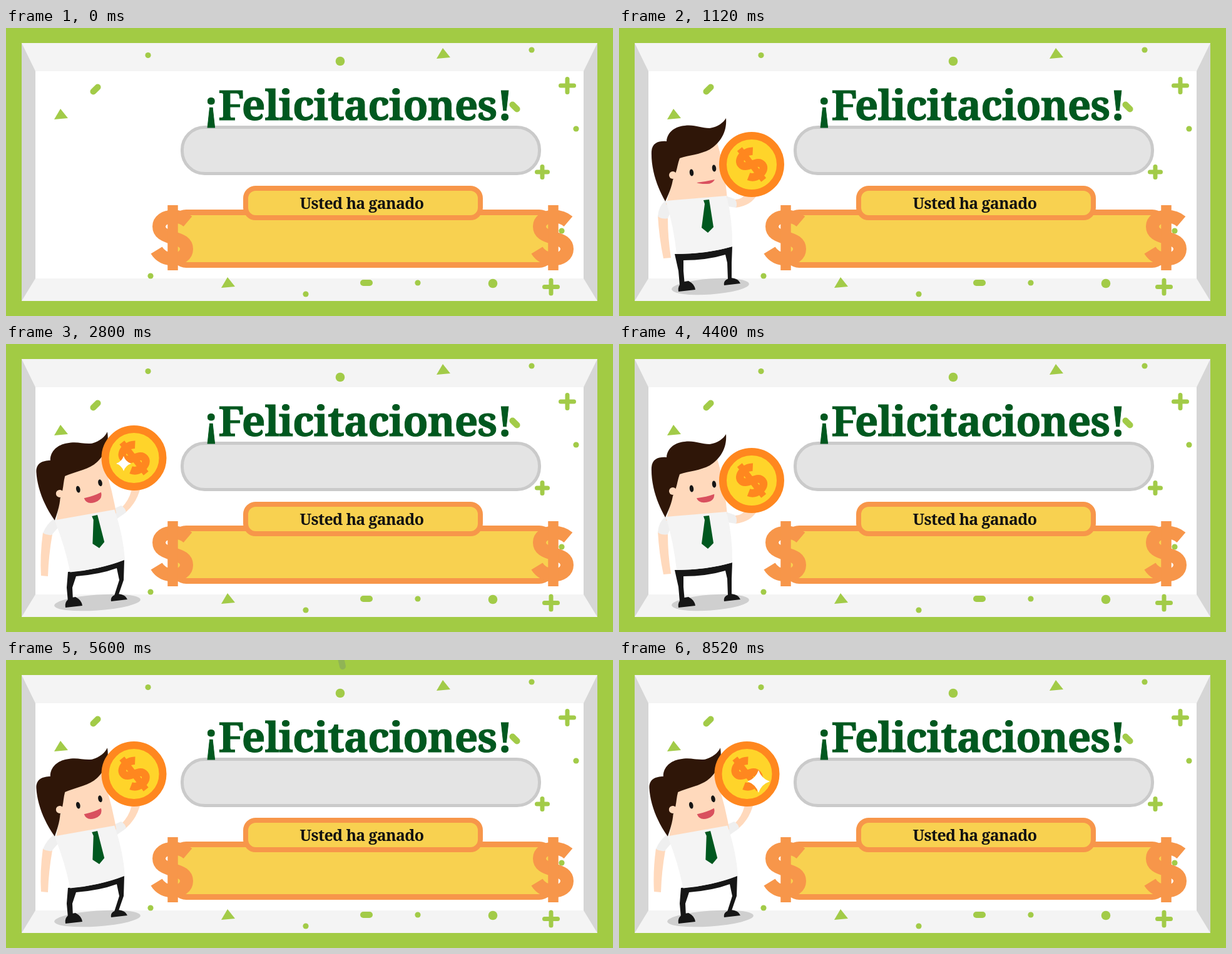
Recreate the animation shown at these times as an HTML page. Size 970 px wide and 460 px high, loop 8560 ms.

```html
<!DOCTYPE html>
<html lang="es">
<head>
<meta charset="utf-8">
<style>
html, body { margin: 0; width: 100%; height: 100%; overflow: hidden; background: #a2cb44; }
svg { display: block; width: 970px; height: 460px; }
text { font-family: "Noto Serif", serif; font-weight: 700; text-anchor: middle; }
</style>
</head>
<body>
<svg viewBox="0 0 970 460">
  <defs>
    <g id="dollar" fill="none" stroke="currentColor">
      <path stroke-width="21" d="M24-26C17-32 10-34 1-34C-13-34-22-27-22-18C-22-8-14-4 0 0C14 4 22 8 22 18C22 28 13 34 0 34C-10 34-20 30-26 20"/>
      <path stroke-width="16.500" d="M0-52V52"/>
    </g>
  </defs>

  <path fill="#f4f4f4" d="M25 24H945V436H25Z"/>
  <path fill="#d6d6d6" d="M25 24L47 69V400L25 436ZM945 24L923 69V400L945 436Z"/>
  <path fill="#fff" d="M47 69H923V400H47Z"/>
  <g id="bits" fill="#a2cb48" stroke="#a2cb48" stroke-linecap="round"></g>

  <rect x="281.500" y="158.500" width="571" height="74" rx="36" fill="#e4e4e4" stroke="#cacaca" stroke-width="5"/>
  <text x="562" y="147" font-size="66" letter-spacing="-1" fill="#00581f" stroke="#00581f">¡Felicitaciones!</text>
  <rect x="268" y="294.500" width="604" height="84" rx="20" fill="#f8d150" stroke="#f7964a" stroke-width="9"/>
  <rect x="383" y="256" width="375" height="47" rx="16" fill="#f8d150" stroke="#f7964a" stroke-width="8"/>
  <text x="568.500" y="289" font-size="25" letter-spacing="-.7" fill="#111">Usted ha ganado</text>
  <g color="#f7964a">
    <use href="#dollar" x="266.500" y="335"/>
    <use href="#dollar" x="874.500" y="335"/>
  </g>

  <g id="man">
    <ellipse id="shadow" cx="146" cy="413" ry="12.500" fill="#cfcfcf" transform="rotate(-4 146 413)"/>
    <g fill="#ffd9bc"><path id="armL"/><path id="armR"/></g>
    <path id="legs" fill="#161616"/>
    <path fill="#161616" d="M95 421Q93 409 105 405L111 404Q121 409 122 418ZM168 411Q166 402 179 399Q191 400 194 408Z"/>
    <g fill="#efefef"><path id="sleeveL"/><path id="sleeveR"/></g>
    <g id="head">
      <path fill="#ffd9bc" d="M97 195L156 180Q169 222 173 275L75 282L88 235Z"/>
      <path fill="#2f1608" d="M74 277C59 251 51 222 52 197C53 183 64 180 76 181C77 166 90 157 105 156C122 154 130 160 145 160C158 158 167 151 171 144C173 168 160 185 145 194C130 202 112 203 97 208C94 216 93 224 91 230L86 243C84 255 79 266 74 277Z"/>
      <circle cx="86" cy="235" r="6" fill="#ffd9bc"/>
      <g fill="#161616">
        <ellipse cx="116" cy="231" rx="3.200" ry="5.500" transform="rotate(-8 116 231)"/>
        <ellipse cx="152" cy="224" rx="3.200" ry="5.500" transform="rotate(-8 152 224)"/>
      </g>
      <path id="mouth" fill="#d9505e"/>
    </g>
    <g id="torso">
      <path fill="#f4f4f4" d="M75 276L172 268Q182 310 181 349Q140 361 92 361Q88 320 75 276Z"/>
      <path fill="#00581f" d="M135 275L144 274L145 280L151 318L142 327L132 319L137 281Z"/>
    </g>
    <g id="coin">
      <circle r="46" fill="#ffd42a" stroke="#ff871f" stroke-width="12"/>
      <use href="#dollar" color="#ff871f" transform="rotate(-38) scale(.6)"/>
    </g>
    <path id="spark" fill="#fff" d="M0-1Q.25-.25 1 0Q.25.25 0 1Q-.25.25-1 0Q-.25-.25 0-1Z"/>
  </g>
  <g id="rain" fill="none" stroke="#68827f" stroke-opacity=".3" stroke-width="10" stroke-linecap="round"></g>
</svg>
<script>
const LOOP = 8560;
const $ = id => document.getElementById(id);
const set = (id, name, value) => $(id).setAttribute(name, value);

// Static confetti
const dots = [[227, 43.5, 4.6], [534, 53, 7.3], [840, 35, 4.6], [911, 161, 4.6], [888, 324, 4.6],
  [231, 396, 4.6], [479, 425, 4.6], [658, 407, 4.6], [778, 408, 7.3]];
const triangles = [[87, 129], [698, 32], [354, 398]];
const pills = [[143, 98, -45], [813, 126, 45], [576, 407, 0]];
const pluses = [[897, 92, 10.5], [857, 230, 8.5], [871, 413.5, 10.5]];
$('bits').innerHTML =
  dots.map(([x, y, r]) => `<circle cx="${x}" cy="${y}" r="${r}" stroke="none"/>`).join('') +
  triangles.map(([x, y]) => `<path stroke="none" d="M${x} ${y}l-10 17l22-2Z"/>`).join('') +
  pills.map(([x, y, a]) => `<path stroke-width="10" transform="translate(${x} ${y}) rotate(${a})" d="M-5 0H5"/>`).join('') +
  pluses.map(([x, y, r]) => `<path stroke-width="7" d="M${x - r} ${y}h${2 * r}M${x} ${y - r}v${2 * r}"/>`).join('');

// Limb outlines: [coin lowered, coin raised]
const limbs = {
  armL: ['M62 299Q64 335 71 368L83 367Q78 335 78 304Z', 'M59 301Q54 338 56 370L67 371Q68 338 74 304Z'],
  armR: ['M186 274Q198 274 204 262L222 264Q212 284 186 287Z', 'M184 262Q199 248 202 226L215 229Q209 254 191 269Z'],
  sleeveL: ['M75 275Q63 284 62 301Q69 306 78 304L84 290Z', 'M78 278Q65 287 59 302Q66 306 73 305L86 290Z'],
  sleeveR: ['M170 268L185 273Q190 280 187 287L174 285Z', 'M168 265L184 258Q191 262 192 269L176 280Z'],
  legs: ['M89 361Q140 361 181 349L180 375L180 402L174 402L173 375L170 362Q140 371 103 371L103 388L105 411L97 411L95 388Z',
    'M99 364Q148 361 189 345L188 377L179 403L173 402L181 377L177 358Q150 368 112 371L106 389L107 410L99 411L97 389Z']
};

const lerp = (a, b, p) => a + (b - a) * p;
const ramp = (t, from, to) => {
  const p = Math.min(1, Math.max(0, (t - from) / (to - from)));
  return p * p * (3 - 2 * p);
};
const mix = (a, b, p) => {
  const end = b.match(/\d+/g);
  let i = 0;
  return a.replace(/\d+/g, n => lerp(+n, +end[i++], p).toFixed(2));
};

const SLOT = 443;
const glints = [[188, 191], [201, 153], [223, 194]];

function sparkle(t) {
  const start = t < 4039 ? 2710 : 6084;
  const n = (t - start) / SLOT;
  const r = n < 0 ? 0 : 18 * Math.sin(Math.PI * (n % 1)) ** 0.8;
  const [x, y] = glints[n < 0 ? 0 : Math.floor(n) % 3];
  set('spark', 'transform', `translate(${x} ${y}) scale(${r})`);
}

function rain(t) {
  const start = t < 4000 ? 1985 : 5585;
  let d = '';
  for (let i = 0; i < 13; i++) {
    const x = (537 + i * 173) % 970;
    const y = (t - start - (i && 20 + i * 6)) * 0.95 - 5;
    if (y > -5 && y < 495) d += `M${x + 1} ${y}l-5-22`;
  }
  $('rain').innerHTML = `<path d="${d}"/>`;
}

function draw(t) {
  const up = ramp(t, 1560, 1840) - ramp(t, 4040, 4240) + ramp(t, 4760, 5040);
  const smile = ramp(t, 1560, 1840) * (0.75 + 0.25 * up);
  const enter = 1 - Math.min(1, t / 760);
  set('man', 'transform', `translate(${-290 * enter ** 3} 0)`);
  for (const id in limbs) set(id, 'd', mix(...limbs[id], up));
  set('shadow', 'rx', lerp(62, 69, up));
  set('head', 'transform', `translate(${-0.5 * up} ${up}) rotate(${-5.4 * up} 117 233)`);
  set('torso', 'transform', `translate(${up} 0) rotate(${-5.4 * up} 135 262)`);
  set('mouth', 'd', mix('M124 247Q140 245 153 242Q149 250 138 249Q129 249 124 247Z',
    'M124 246Q140 244 152 239Q154 251 141 254Q127 257 124 246Z', smile));
  set('coin', 'transform', `translate(${lerp(212, 204.5, up)} ${lerp(218, 182, up)})`);
  sparkle(t);
  rain(t);
}

function tick() {
  draw(performance.now() % LOOP);
  requestAnimationFrame(tick);
}
tick();
</script>
</body>
</html>
```
